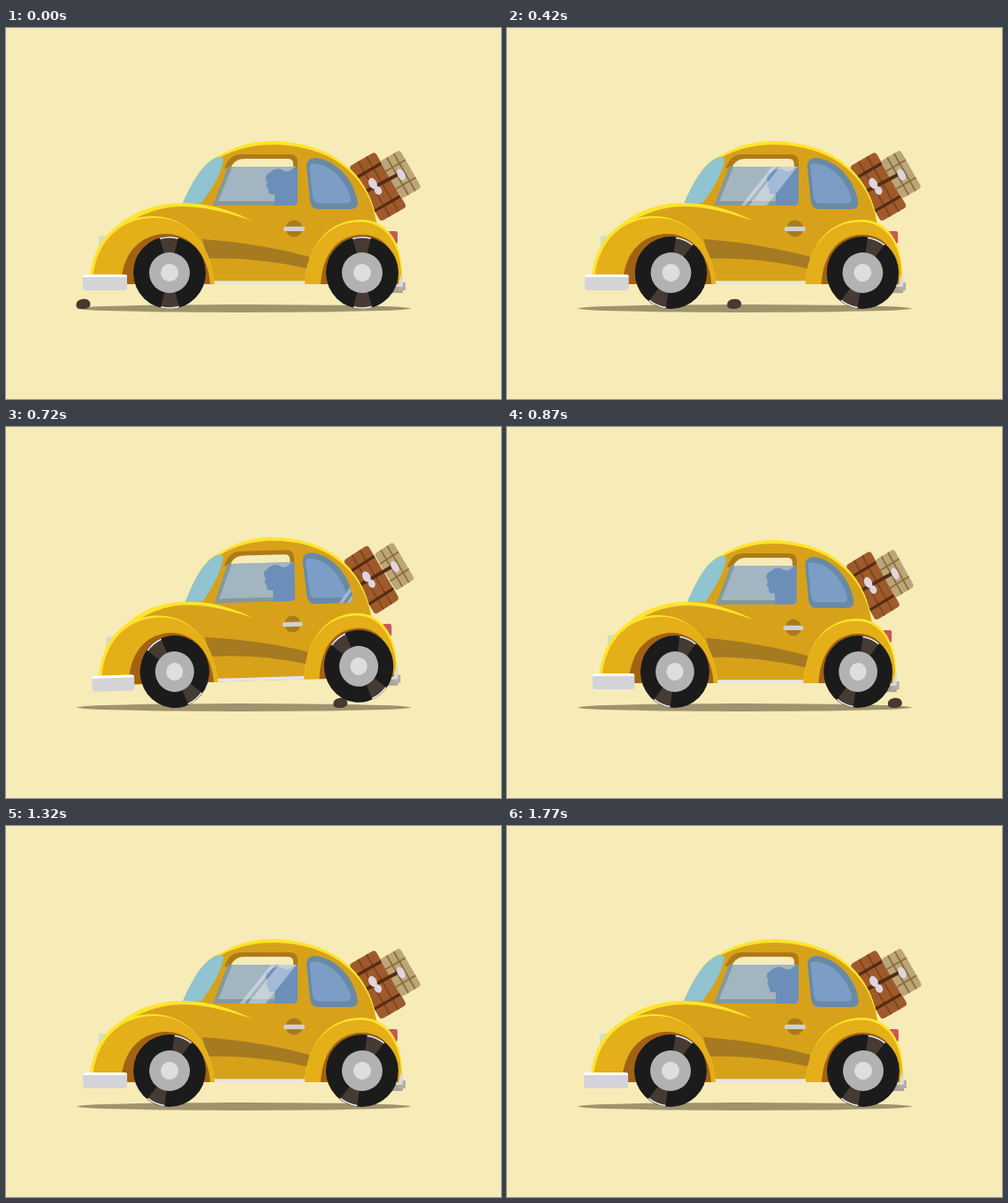
Animation, 560 px wide and 420 px high, one loop 1.8 s. Source, as an HTML page:

```html
<!DOCTYPE html>
<html lang="en">
<head>
<meta charset="utf-8">
<title>Bumpy ride</title>
<style>
html, body { margin: 0; width: 100%; height: 100%; overflow: hidden; background: #f7ebb8; }
svg { display: block; width: 560px; height: 420px; }
</style>
</head>
<body>
<svg viewBox="0 0 560 420">
  <defs>
    <g id="tread" fill="none">
      <path d="M-10.6 -39.5 A41 41 0 0 1 10.6 -39.5 L6 -22 H-6Z" fill="#463a34"/>
      <path d="M-10.3 -38.6 A40 40 0 0 1 10.3 -38.6" stroke="#f0ecea" stroke-width="1.6"/>
    </g>
    <g id="wheel">
      <circle r="41" fill="#1b1b1b"/>
      <use href="#tread"/>
      <use href="#tread" transform="rotate(180)"/>
      <circle r="23" fill="#b2b2b2"/>
      <circle r="10" fill="#dedede"/>
    </g>
    <path id="glass" d="M251 157H330V195Q330 201 324 201H234Z"/>
    <path id="quarter" d="M350 147C376 150 395 175 398 198Q398 205 390 205H354Q345 205 344 196L340 157Q340 147 350 147Z"/>
    <clipPath id="panes"><use href="#glass"/><use href="#quarter"/></clipPath>
  </defs>

  <ellipse cx="269" cy="317.5" rx="189" ry="4.4" fill="#9f936e"/>
  <path id="rock" d="M-8 1C-8 -4 -4 -6 1 -6C6 -6 8 -3 8 0C8 3 5 5 0 5.4C-5 5.6 -8 4 -8 1Z" fill="#493a30"/>

  <g id="car">
    <!-- luggage -->
    <g transform="translate(388 157) rotate(-30)">
      <rect width="34" height="72" rx="4" fill="#9f5a2c"/>
      <path d="M12 0V72M23 0V72" stroke="#7d421c" stroke-width="1.6"/>
      <path d="M0 15H34M0 58H34" stroke="#552c12" stroke-width="3.2"/>
    </g>
    <g id="small">
      <g transform="translate(423 151) rotate(-30)">
        <rect width="26" height="49" rx="3.5" fill="#bba679"/>
        <path d="M9 0V49M18 0V49M0 13H26M0 36H26" stroke="#8d6c3b" stroke-width="1.8"/>
      </g>
    </g>
    <path id="strap" stroke="#552c12" stroke-width="4"/>
    <g fill="#ded6dc">
      <ellipse cx="415" cy="176" rx="4.5" ry="6.5" transform="rotate(-28 415 176)"/>
      <ellipse cx="421" cy="184" rx="4" ry="5" transform="rotate(-28 421 184)"/>
      <ellipse id="grip" cx="447" cy="166" rx="4" ry="7"/>
    </g>

    <!-- lamps and rear bumper -->
    <rect x="105" y="235" width="12" height="17" rx="3" fill="#cfdfc9"/>
    <rect x="432" y="230" width="11" height="14" rx="2" fill="#c9565a"/>
    <rect x="436" y="292" width="13" height="8" fill="#a9a597"/>
    <rect x="444" y="288" width="8" height="9" fill="#b3afa4"/>
    <rect x="440" y="277" width="9" height="16" rx="1" fill="#d9d9db"/>

    <!-- body -->
    <path d="M200 199C210 176 222 152 240 145C260 133 280 128 303 128C368 130 412 163 420 222L300 230Z" fill="#ffe42c"/>
    <path d="M110 250C130 220 160 201 200 199C210 176 222 154 240 147.5C260 137 280 132 303 132C365 133 410 164 419.5 222V290H150Z" fill="#d7a219"/>
    <path d="M108 244C130 214 160 198 200 198C230 198 255 207 278 218C250 209 225 202 200 202C165 202 135 218 108 244Z" fill="#ffe42c"/>
    <rect x="225" y="286.3" width="125" height="3.7" fill="#e6e5ec"/>
    <path d="M222 239C265 242 310 250 343 259V273C305 264 265 260 228 261Z" fill="#a67a20"/>
    <path d="M200 198C210 176 222 152 240 146C246 145 247 149 245 154C240 172 230 186 221 198Z" fill="#8fc4d0"/>

    <!-- windows -->
    <path d="M247 159C252 146 258 143 268 143H321Q330 143 330 152V160Z" fill="#ae7a19"/>
    <path d="M254 158C258 151 262 148 271 148H319Q325 148 325 154V158Z" fill="#f7ebb8"/>
    <use href="#glass" fill="#84999c"/>
    <path d="M256 157H328V192H322L320 196H240Z" fill="#a2b5c0"/>
    <path d="M324 201H304V188C299 189 296 187 297 184L296 181L294 179L296 175C293 171 293 166 298 164C302 160 308 158 313 161C318 164 322 162 326 158L330 157V195Q330 201 324 201Z" fill="#6c8fba"/>
    <use href="#quarter" fill="#698aa5"/>
    <path d="M347 153.5C366 153.5 383 170 390 192Q391 198.5 385 198.5H355Q348 198.5 347 191L343.5 158Q343 153.5 347 153.5Z" fill="#7c9dc5"/>
    <g clip-path="url(#panes)">
      <path id="gleam" d="M-24 30L24 -30H44L-4 30ZM-33 30L15 -30H20L-28 30Z" fill="#fff" fill-opacity=".38"/>
    </g>

    <circle cx="326" cy="227" r="9.5" fill="#a97b1e"/>
    <rect x="314" y="224.7" width="24" height="5.3" rx="2.6" fill="#d0d0d3"/>

    <!-- fenders -->
    <path d="M95 280C100 239 126 213 165 213C206 213 232 245 236 290H131V280Z" fill="#ffe42c"/>
    <path d="M98.5 280C103 242 129 215.5 167 215C206 214 232 245 236 290H131V280Z" fill="#e4af18"/>
    <path d="M130 290C132 252 154 233 182 233C212 234 229 260 231 290Z" fill="#a26214"/>
    <path d="M338 290C340 250 362 217 402 217C433 217 448 245 448 278L444 290Z" fill="#ffe42c"/>
    <path d="M338 290C340 250 362 219.5 401 219.5C430 219.5 446 246 447 278L444 290Z" fill="#e4af18"/>
    <path d="M356 290C358 255 376 234 403 234C430 234 442 255 444 290Z" fill="#a26214"/>

    <g transform="translate(185 277)"><use class="wheel" href="#wheel"/></g>
    <g transform="translate(403 277)"><use class="wheel" href="#wheel"/></g>

    <rect x="87" y="279" width="50" height="18" rx="3" fill="#d4d4d8"/>
    <path d="M87 282Q87 279 90 279H134Q137 279 137 282Z" fill="#fff"/>
  </g>
</svg>
<script>
const LOOP = 1800, GLEAM = 900;
const $ = id => document.getElementById(id);
const move = (el, value) => el.setAttribute('transform', value);
const wheels = document.querySelectorAll('.wheel');

// smooth hump from 0 to 1 and back, centred on mid
const hump = (t, mid, half) =>
  Math.abs(t - mid) < half ? (1 + Math.cos(Math.PI * (t - mid) / half)) / 2 : 0;

function draw(now) {
  const t = now % LOOP;
  const front = hump(t, 235, 102), rear = hump(t, 770, 102);
  const squeeze = 1 - 0.05 * hump(t, 835, 520);

  move($('car'), `translate(285 0) scale(${squeeze} 1) translate(-285 0)` +
    ` rotate(${3.05 * front} 403 226) rotate(${-3.05 * rear} 185 226)`);
  wheels.forEach(w => move(w, `rotate(${-0.8 * t})`));

  const hop = 3.6 * (front + rear), lift = -0.8 * (front + rear);
  move($('small'), `translate(${hop} ${lift})`);
  move($('grip'), `translate(${hop} ${lift}) rotate(-28 447 166)`);
  $('strap').setAttribute('d', `M405 186L${447 + hop} ${164 + lift}`);

  move($('gleam'), `translate(${290 + 0.4 * (t % GLEAM - 420)} 180)`);

  move($('rock'), `translate(${87 + 0.404 * t} 312.7)`);
  $('rock').style.display = t < 1035 ? '' : 'none';
}

const start = performance.now();
function tick() {
  draw(performance.now() - start);
  requestAnimationFrame(tick);
}
tick();
</script>
</body>
</html>
```
